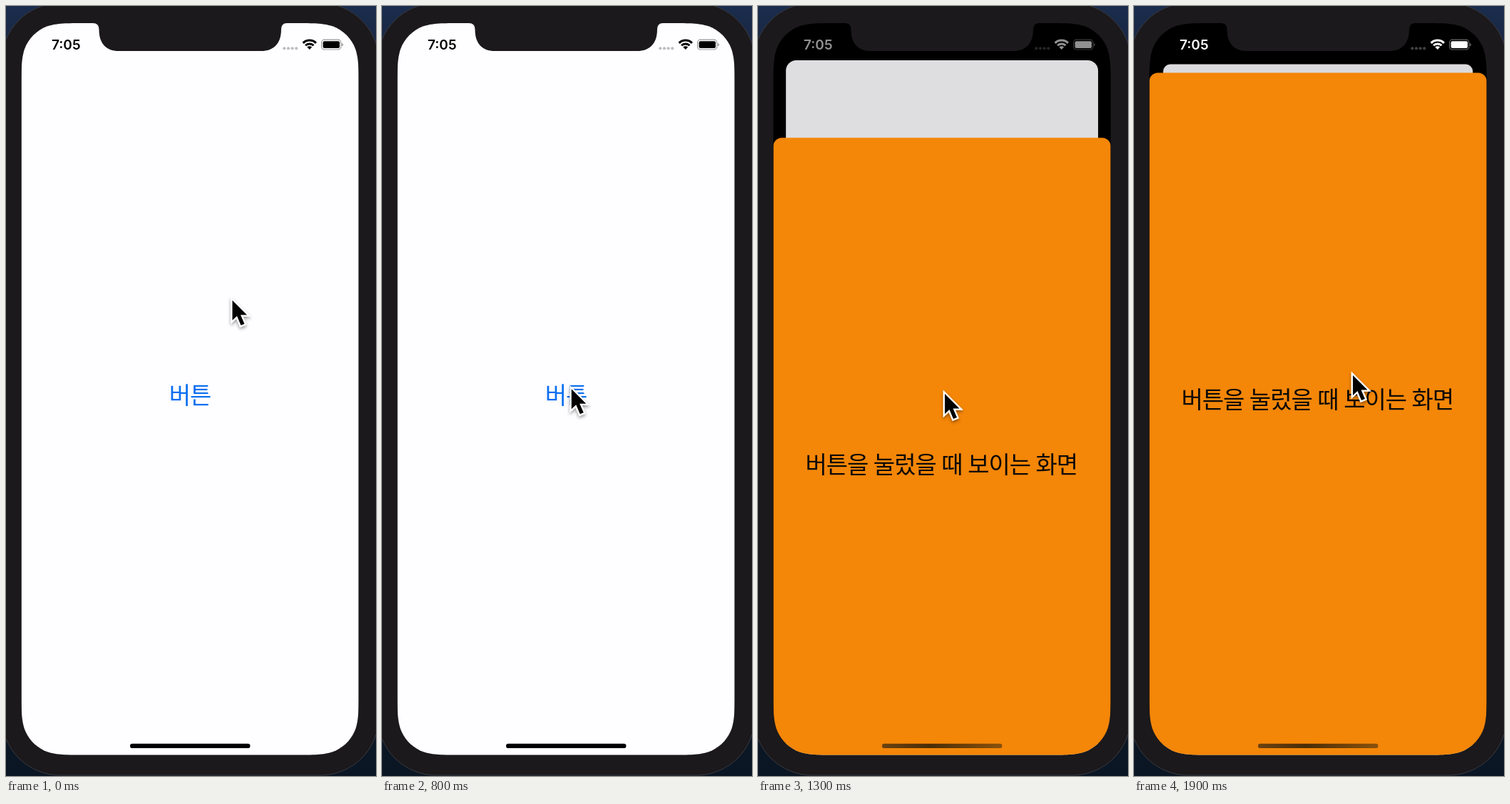
An HTML page for the animation above (2 s loop, 519 by 1078 pixels).

```html
<!DOCTYPE html>
<html lang="ko">
<head>
<meta charset="utf-8">
<title>버튼</title>
<style>
  html, body { margin: 0; width: 100%; height: 100%; overflow: hidden; background: #101a2c; }
  svg { display: block; width: 100vw; height: 100vh; }
  .ko {
    font: 400 33px "Noto Sans CJK KR", "Noto Sans CJK", sans-serif;
    letter-spacing: -1.1px; word-spacing: -.5px; text-anchor: middle;
  }
  .clock { font: 600 19px Inter, sans-serif; }
</style>
</head>
<body>
<svg viewBox="0 0 519 1078" preserveAspectRatio="none">
  <defs>
    <linearGradient id="desk" x2="0" y2="1">
      <stop offset="0" stop-color="#1b2d4d"/>
      <stop offset=".1" stop-color="#142038"/>
      <stop offset="1" stop-color="#0b1624"/>
    </linearGradient>
    <linearGradient id="brown">
      <stop offset="0" stop-color="#6b4210"/>
      <stop offset=".4" stop-color="#4a2d08"/>
      <stop offset="1" stop-color="#8a520c"/>
    </linearGradient>
    <clipPath id="display"><path id="outline"/></clipPath>
    <filter id="shadow" x="-50%" y="-50%" width="200%" height="200%">
      <feDropShadow dx="0" dy="2.5" stdDeviation="2.2" flood-color="#000" flood-opacity=".4"/>
    </filter>
  </defs>

  <rect width="519" height="1078" fill="url(#desk)"/>
  <rect x="-6" y="-4" width="529" height="1081" rx="82" fill="#1b191c" stroke="#3b3a3e"/>

  <g clip-path="url(#display)">
    <rect x="21" y="24" width="475" height="1025" fill="#000"/>
    <rect id="card"/>
    <text id="button" class="ko" x="258" y="556.500" fill="#0a6ff0">버튼</text>
    <g id="sheet">
      <rect x="21.500" width="473.200" height="1100" rx="12" fill="#f48608"/>
      <text class="ko" x="257.300" y="469" fill="#0c0a08">버튼을 눌렀을 때 보이는 화면</text>
    </g>
    <g id="status">
      <text class="clock" x="64" y="61.300">7:05</text>
      <g opacity=".25">
        <circle cx="390.300" cy="59.300" r="2.100"/><circle cx="396" cy="59.300" r="2.100"/>
        <circle cx="401.600" cy="59.300" r="2.100"/><circle cx="407.300" cy="59.300" r="2.100"/>
      </g>
      <g id="wifi"/>
      <rect x="442.600" y="47.200" width="27.200" height="13.800" rx="4" fill="none" stroke="currentColor" stroke-opacity=".4" stroke-width="1.200"/>
      <rect x="444.600" y="49.200" width="23.400" height="9.800" rx="2"/>
      <path d="M471.2 52v4.4q1.6-.6 1.6-2.2t-1.6-2.2z" opacity=".45"/>
    </g>
    <rect id="home" x="174" y="1032.800" width="168.500" height="6.200" rx="3.100"/>
    <path fill="#1b191c" d="M122 23V24Q130.500 24 130.500 33C130.500 53 141 63 158 63H358C375 63 386 53 386 33Q386 24 394 24V23Z"/>
  </g>

  <g id="cursor" filter="url(#shadow)">
    <path d="M0 0V28L6.500 22L12 35L17 33L11.500 20.500H20.500Z" fill="#000" stroke="#fff" stroke-width="4.600" paint-order="stroke"/>
  </g>
</svg>
<script>
const LOOP = 2000, STEP = 100;
const $ = id => document.getElementById(id);
const set = (el, attrs) => { for (const k in attrs) el.setAttribute(k, attrs[k]); };
const mix = (a, b, p) => a + (b - a) * p;
const clamp = v => Math.max(0, Math.min(1, v));
const smooth = p => p * p * (3 - 2 * p);

// Rounded display outline with continuous-curvature corners
function squircle(x, y, w, h, r) {
  const half = [[0, 1.5287], [0, 1.0885], [0, .8684], [.0749, .6315], [.169, .3728]];
  const pts = half.concat(half.slice().reverse().map(([a, b]) => [b, a]));
  const corner = (cx, cy, sx, sy, flip) => {
    const p = pts.map(([a, b]) => `${cx + sx * a * r} ${cy + sy * b * r}`);
    if (flip) p.reverse();
    return `${p[0]}C${p[1]} ${p[2]} ${p[3]}C${p[4]} ${p[5]} ${p[6]}C${p[7]} ${p[8]} ${p[9]}`;
  };
  return 'M' + corner(x, y, 1, 1, false) + 'L' + corner(x + w, y, -1, 1, true) +
    'L' + corner(x + w, y + h, -1, -1, false) + 'L' + corner(x, y + h, 1, -1, true) + 'Z';
}
$('outline').setAttribute('d', squircle(21.5, 24, 473.2, 1024.6, 58));

// One 90-degree band of the wireless symbol
function band(inner, outer) {
  const k = Math.SQRT1_2, cx = 425.8, cy = 61;
  const at = (r, s) => `${cx + s * r * k} ${cy - r * k}`;
  return `<path d="M${at(outer, -1)}A${outer} ${outer} 0 0 1 ${at(outer, 1)}L${at(inner, 1)}A${inner} ${inner} 0 0 0 ${at(inner, -1)}Z"/>`;
}
$('wifi').innerHTML = band(11.4, 14.4) + band(6.6, 9.5) + band(0, 4.8);

// time, x, y of the pointer tip
const path = [
  [0, 317.5, 412], [600, 276.5, 517], [900, 262, 543],
  [1600, 262, 543], [1900, 307, 517], [2000, 307, 517]
];
function pointer(t) {
  const i = path.findIndex(k => k[0] > t);
  const a = path[i - 1], b = path[i];
  const p = smooth((t - a[0]) / (b[0] - a[0]));
  return [mix(a[1], b[1], p), mix(a[2], b[2], p)];
}

// Critically damped spring from 0 to 1
function spring(ms) {
  const u = Math.max(0, ms) * .0213;
  return 1 - (1 + u) * Math.exp(-u);
}

function draw(t) {
  const p = spring(t - 1114.6), open = p > 0;
  const inset = 19.5 * p, shade = Math.round(mix(254, 219, p));
  set($('card'), {
    x: 21.5 + inset, y: 24 + 57.5 * p, width: 473.2 - 2 * inset, height: 1025,
    rx: open ? mix(60, 10, p) : 0,
    fill: `rgb(${shade},${shade - 1},${shade + 1})`
  });
  set($('button'), { opacity: open ? 0 : t >= 1000 ? .22 : 1 });
  set($('sheet'), {
    transform: `translate(0 ${mix(1048, 93.5, p)})`,
    display: open ? 'inline' : 'none'
  });
  const tone = Math.round(255 * clamp((t - 1220) / 140));
  const ink = `rgb(${tone},${tone},${tone})`;
  set($('status'), { fill: ink, color: ink });
  set($('home'), { fill: open ? 'url(#brown)' : '#000' });
  set($('cursor'), { transform: `translate(${pointer(t)})` });
}

function tick() {
  const t = performance.now() % LOOP;
  draw(Math.floor(t / STEP) * STEP);
  requestAnimationFrame(tick);
}
tick();
</script>
</body>
</html>
```
